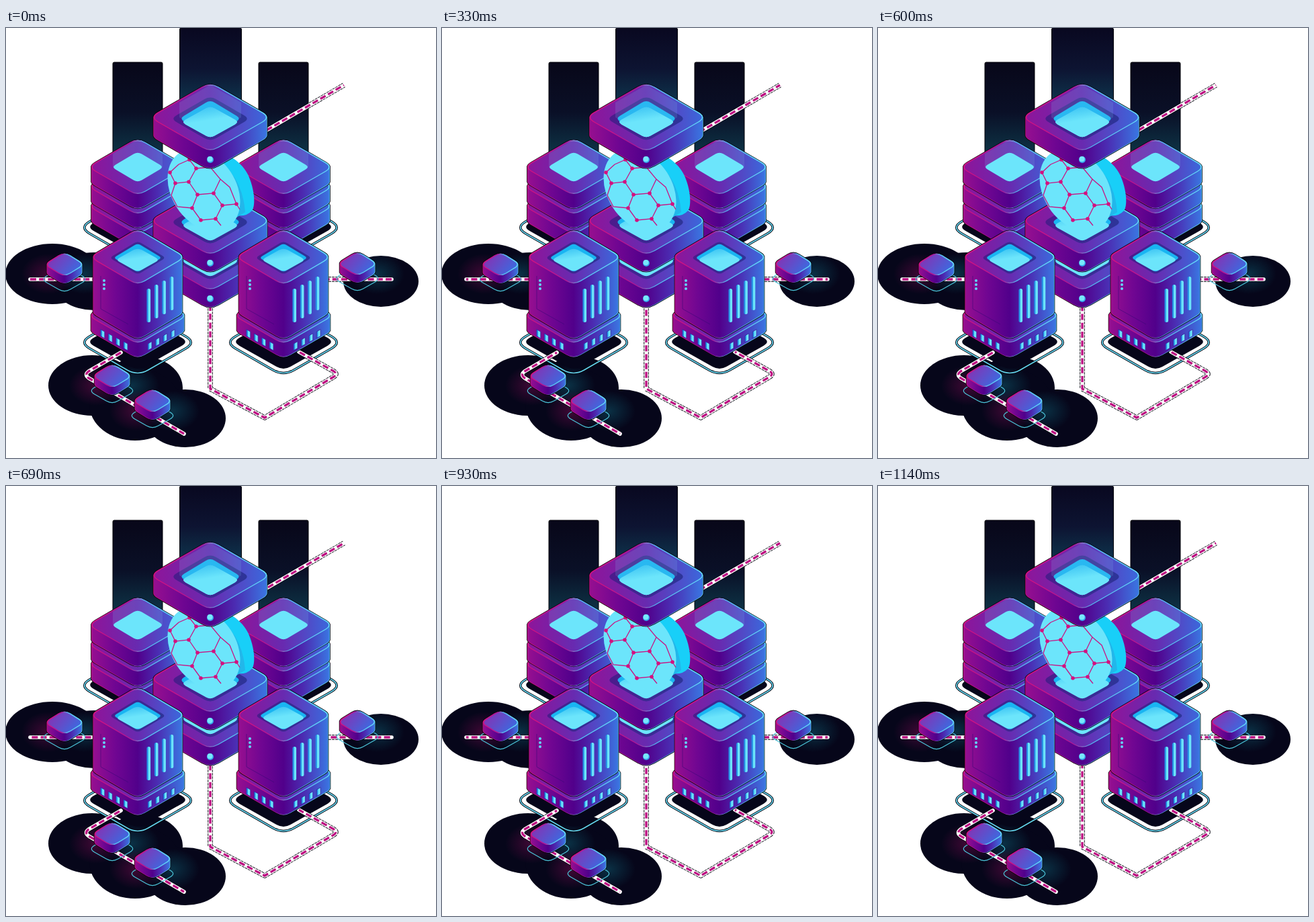
These frames come from a looping animation (640x640 px, 1.17 s). An HTML page:

```html
<!DOCTYPE html>
<html lang="en">
<head>
<meta charset="utf-8">
<title>Isometric server network</title>
<style>
  html, body { margin: 0; width: 100%; height: 100%; overflow: hidden; background: #fff; }
  svg { display: block; width: 640px; height: 640px; }
</style>
</head>
<body>
<svg id="stage" viewBox="0 0 640 640" fill="none">
  <defs>
    <linearGradient id="body">
      <stop offset="0" stop-color="#960f90"/><stop offset=".25" stop-color="#700692"/>
      <stop offset=".5" stop-color="#51008b"/><stop offset=".72" stop-color="#4b2cb2"/>
      <stop offset="1" stop-color="#3a76e2"/>
    </linearGradient>
    <linearGradient id="top">
      <stop offset="0" stop-color="#8e159a"/><stop offset=".5" stop-color="#682ab0"/>
      <stop offset="1" stop-color="#3b68dc"/>
    </linearGradient>
    <linearGradient id="lid" x2="1" y2=".5">
      <stop offset="0" stop-color="#8f2bae"/><stop offset="1" stop-color="#3f67de"/>
    </linearGradient>
    <linearGradient id="edge">
      <stop offset="0" stop-color="#d5127f"/><stop offset=".42" stop-color="#b01796"/>
      <stop offset=".58" stop-color="#53b5f0"/><stop offset="1" stop-color="#65ddf8"/>
    </linearGradient>
    <linearGradient id="recess">
      <stop offset="0" stop-color="#4c1b8c"/><stop offset="1" stop-color="#2d3599"/>
    </linearGradient>
    <linearGradient id="slot">
      <stop offset=".3" stop-color="#238fe5"/><stop offset=".45" stop-color="#6be4fa"/>
    </linearGradient>
    <linearGradient id="pool" x1=".3" y1="0" x2=".6" y2="1">
      <stop offset="0" stop-color="#3dc4f3"/><stop offset=".45" stop-color="#6ce5fb"/>
    </linearGradient>
    <linearGradient id="beam" x2="0" y2="1">
      <stop offset="0" stop-color="#080719"/><stop offset=".5" stop-color="#0a1027"/>
      <stop offset="1" stop-color="#0e3c4d"/>
    </linearGradient>
    <linearGradient id="tallBeam" x2="0" y2="1">
      <stop offset="0" stop-color="#090820"/><stop offset=".45" stop-color="#0d1432"/>
      <stop offset="1" stop-color="#0e4458"/>
    </linearGradient>
    <radialGradient id="pinkGlow">
      <stop offset="0" stop-color="#7a0a50" stop-opacity=".5"/>
      <stop offset="1" stop-color="#7a0a50" stop-opacity="0"/>
    </radialGradient>
    <radialGradient id="tealGlow">
      <stop offset="0" stop-color="#0f6478" stop-opacity=".45"/>
      <stop offset="1" stop-color="#0f6478" stop-opacity="0"/>
    </radialGradient>
  </defs>
</svg>
<script>
const stage = document.getElementById('stage');
const LOOP = 1170, STEP = 30, DASH = 9, PERIOD = 13.2, CYCLES = 2;
const CYAN = '#6ce5fb', NIGHT = '#06061a';
const dashes = [];

function add(tag, attrs) {
  const el = document.createElementNS('http://www.w3.org/2000/svg', tag);
  for (const key in attrs) el.setAttribute(key, attrs[key]);
  stage.append(el);
  return el;
}
const path = (d, attrs) => add('path', { d, ...attrs });
const ellipse = (cx, cy, rx, ry, fill) => add('ellipse', { cx, cy, rx, ry, fill });

// Closed polygon with corners softened by r
function rounded(points, r) {
  const toward = (a, b) => {
    const k = r / Math.hypot(b[0] - a[0], b[1] - a[1]);
    return [a[0] + (b[0] - a[0]) * k, a[1] + (b[1] - a[1]) * k];
  };
  const n = points.length;
  return points.map((p, i) =>
    `${i ? 'L' : 'M'}${toward(p, points[(i + n - 1) % n])}Q${p} ${toward(p, points[(i + 1) % n])}`
  ).join('') + 'Z';
}
const rhombus = (x, y, w, h, r) =>
  rounded([[x, y - h], [x + w, y], [x, y + h], [x - w, y]], r);

// The body spans the rounded top and bottom faces and the walls between them
function block(x, y, w, h, depth, r, topFill = 'url(#top)') {
  const half = w - r * r / Math.hypot(w, h) * w / r / 2;
  const shell = rhombus(x, y, w, h, r) + rhombus(x, y + depth, w, h, r) +
    `M${x - half} ${y}h${2 * half}v${depth}h${-2 * half}Z`;
  path(shell, { stroke: '#05030f', 'stroke-width': 3 });
  path(shell, { stroke: 'url(#edge)', 'stroke-width': 1.4 });
  path(shell, { fill: 'url(#body)' });
  path(rhombus(x, y, w - .5, h - .5, r), { fill: topFill, stroke: 'url(#edge)', 'stroke-width': 1.4 });
}

function pool(x, y, w, h, fill = 'url(#pool)') {
  path(rhombus(x, y, w, h, 7), { fill });
}

function slab(y) {
  block(304, y, 90, 52, 26.5, 14);
  path(rhombus(304, y + 2, 59, 34, 10), { fill: 'url(#recess)' });
  path(rhombus(304, y + 2, 46, 28, 8), { fill: '#19b5f2' });
  pool(304, y + 7, 43, 24);
  ellipse(304, y + 63, 5, 5, '#36a7ee');
  ellipse(303.5, y + 62, 4, 4, '#78e8fb');
}

function platform(x, y) {
  const ring = rhombus(x, y, 87, 50, 18);
  path(ring, { stroke: '#05050f', 'stroke-width': 3.6 });
  path(ring, { stroke: '#62d3ec', 'stroke-width': 1.7 });
  path(rhombus(x, y - 1, 76, 43, 12), { fill: NIGHT });
}

function beamLight(x, y, half, rise) {
  path(`M${x - half} ${y - rise}L${x} ${y - rise - half * .57}L${x + half} ${y - rise}V${y}L${x} ${y + half * .57}L${x - half} ${y}Z`,
    { fill: '#7fc8e8', opacity: .16 });
}

function stack(x) {
  platform(x, 297);
  for (const y of [265, 236, 207]) block(x, y, 74, 43, 21, 13);
  beamLight(x, 207, 37, 20);
  pool(x, 207, 39, 23, CYAN);
}

function tower(x) {
  block(x, 428, 74, 43, 21, 12);
  for (let i = 0; i < 4; i++) {
    const near = 15 + i * 11.4, y = 470 - i * 6;
    for (const side of [-1, 1]) {
      const a = x + side * near, b = a + side * 6;
      path(`M${a} ${y}L${b} ${y - 3.4}v10L${a} ${y + 10}Z`,
        { fill: 'url(#slot)', stroke: '#3a1b9c', 'stroke-width': .8 });
    }
  }
  block(x, 341, 71, 42, 81, 12);
  path(rhombus(x, 342, 42, 25, 6), { fill: 'url(#recess)' });
  path(rhombus(x, 342, 36, 21.5, 5), { fill: '#19b5f2' });
  pool(x, 345, 33, 18);
  for (let i = 0; i < 4; i++) {
    add('rect', { x: x + 13.5 + i * 11.4, y: 388 - i * 6, width: 5.6, height: 50, rx: 2.5, fill: 'url(#slot)' });
  }
  for (const y of [376, 382, 388]) ellipse(x - 50, y, 2, 2, '#63d5f7');
  path(`M${x - 55} 369V418L${x - 14} 441`, { stroke: '#3c0878', 'stroke-width': 1, opacity: .6 });
}

function cube(x, y) {
  path(rhombus(x, y + 22, 35, 20, 10), { stroke: '#4bc4d8', 'stroke-width': 1.2 });
  block(x, y, 30, 18.5, 11.5, 10, 'url(#lid)');
}

function cable(d) {
  path(d, { stroke: '#05050f', 'stroke-width': 7.4, 'stroke-dasharray': '4 1', 'stroke-linejoin': 'round' });
  path(d, { stroke: '#fff', 'stroke-width': 5.6, 'stroke-linejoin': 'round', 'stroke-linecap': 'round' });
  dashes.push(path(d, { stroke: '#bd0f82', 'stroke-width': 3.3, 'stroke-dasharray': `${DASH} ${PERIOD - DASH}` }));
}

function disc() {
  path('M290 184C325 180 350 197 361 220C371 243 371 266 366 272Q358 281 343 279Z', { fill: '#18cff8' });
  path('M300 188Q351 212 356 274L343 282Z', { fill: '#22b7ea' });
  add('ellipse', { cx: 294.5, cy: 241, rx: 66, ry: 48, transform: 'rotate(57 294.5 241)', fill: CYAN });
  const nodes = [[257, 203], [273, 196], [283, 209], [272, 229], [252, 231], [244, 215],
    [304, 207], [319, 225], [309, 246], [285, 248], [277, 268], [255, 266], [246, 249],
    [290, 286], [312, 284], [322, 264], [343, 262], [333, 237]];
  const routes = [[0, 1, 2, 3, 4, 5, 0], [2, 6, 7, 8, 9, 3], [9, 10, 11, 12, 4], [10, 13, 14, 15, 8], [15, 16, 17, 7]];
  for (const route of routes) {
    path('M' + route.map(i => nodes[i]).join('L'), { stroke: '#c71585', 'stroke-width': 1.3 });
  }
  path('M312 284L320 294M343 262L348 270', { stroke: '#c71585', 'stroke-width': 1.3 });
  for (const i of [1, 2, 3, 4, 5, 8, 9, 10, 13, 14, 15, 16]) ellipse(...nodes[i], 2.8, 2.8, '#d4107f');
}

// Dark ground and glows
for (const [x, y, rx, ry] of [[69, 366, 70, 45], [131, 377, 62, 43], [558, 377, 56, 38],
  [128, 532, 65, 45], [203, 536, 60, 47], [192, 560, 68, 54], [267, 581, 60, 43]]) {
  ellipse(x, y, rx, ry, NIGHT);
}
for (const [x, y] of [[87, 366], [523, 366], [158, 532], [218, 570]]) {
  if (x < 500) ellipse(x - 24, y, 40, 30, 'url(#pinkGlow)');
  ellipse(x + 30, y, 40, 30, 'url(#tealGlow)');
}
for (const [x, y, width, height, fill] of [[159, 51, 74, 150, 'beam'], [376, 51, 74, 150, 'beam'], [258.5, 0, 92, 135, 'tallBeam']]) {
  add('rect', { x, y, width, height, rx: 2, fill: `url(#${fill})`, stroke: '#030308' });
}

stack(196);
stack(413);
platform(196, 468);
platform(413, 468);

cable('M388 152L503 85');
cable('M304 412V537L385 580L488 519Q494 515 488 511L436 482');
cable('M36 374H131');
cable('M574 374H479');
cable('M171 483L123 511Q116 516 123 521L265 604');

slab(340);
slab(287);
disc();
slab(133);
beamLight(304, 133, 46, 22);
pool(304, 140, 43, 24);
tower(196);
tower(413);
for (const [x, y] of [[87, 352], [523, 351], [158, 518], [218, 555]]) cube(x, y);

function draw(now) {
  const time = Math.floor((now % LOOP) / STEP) * STEP;
  const offset = -PERIOD * CYCLES * time / LOOP;
  for (const line of dashes) line.setAttribute('stroke-dashoffset', offset);
  requestAnimationFrame(draw);
}
draw(performance.now());
</script>
</body>
</html>
```
